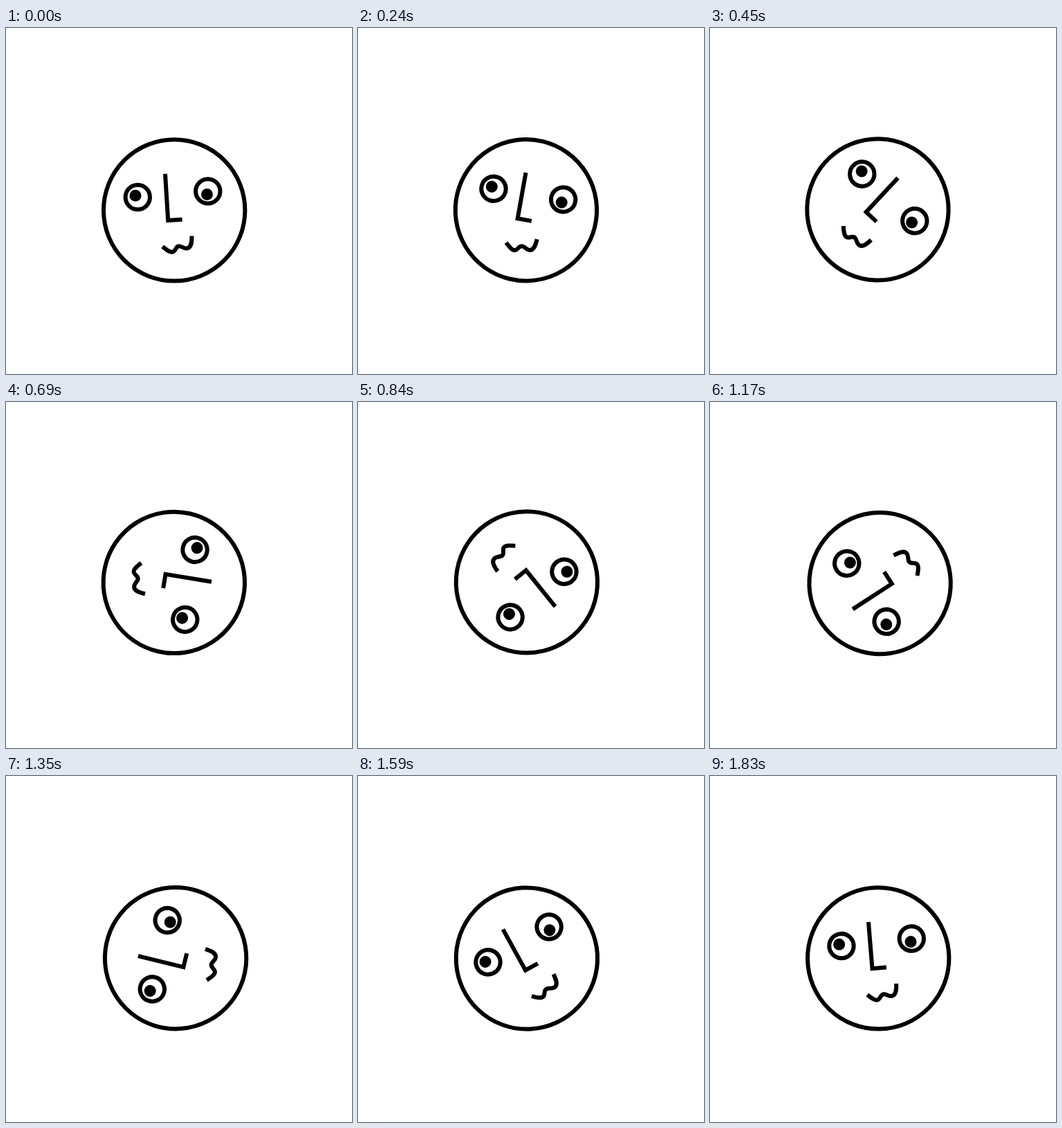
An HTML page that plays this animation: 500 by 500 pixels, repeating every 1.86 s.

```html
<!DOCTYPE html>
<html lang="en">
<head>
<meta charset="utf-8">
<title>Rolling face</title>
<style>
  html, body { margin: 0; width: 100%; height: 100%; overflow: hidden; background: #fff; }
  svg { display: block; width: 100%; height: 100%; }
  .pupil { fill: #000; stroke: none; }
</style>
</head>
<body>
<svg viewBox="0 0 500 500">
  <g id="face" fill="none" stroke="#000" stroke-width="6">
    <circle cx="243.2" cy="263.4" r="102.2"/>
    <circle cx="190.3" cy="244.5" r="17.7"/>
    <circle class="pupil" cx="187" cy="242.2" r="8.5"/>
    <circle cx="291.8" cy="235.9" r="17.7"/>
    <circle class="pupil" cx="290.5" cy="240.5" r="8.5"/>
    <path d="M230 210.8 L234.2 278 L254.6 276.8"/>
    <path d="M226.3 315.8 C232 320.5 237 324.8 241 323.6 C246 322 245 314.5 251 315.4 C256 316.2 257 319.2 262 318.3 C268 317 268.5 309 268.5 300.5"/>
  </g>
</svg>
<script>
  const LOOP = 1860, STEP = 30;
  const EASE_SPAN = 1924.5; // the sine ease is cut slightly short by the loop
  const PIVOT = "244 262";
  const face = document.getElementById("face");

  const ease = t => (1 - Math.cos(Math.PI * t / EASE_SPAN)) / 2;

  function render(time) {
    const t = Math.floor((time % LOOP) / STEP) * STEP;
    const angle = 360 * ease(t) / ease(LOOP);
    face.setAttribute("transform", `rotate(${angle} ${PIVOT})`);
  }

  let start;
  function tick(now) {
    start ??= now;
    render(now - start);
    requestAnimationFrame(tick);
  }
  render(0);
  requestAnimationFrame(tick);
</script>
</body>
</html>
```
